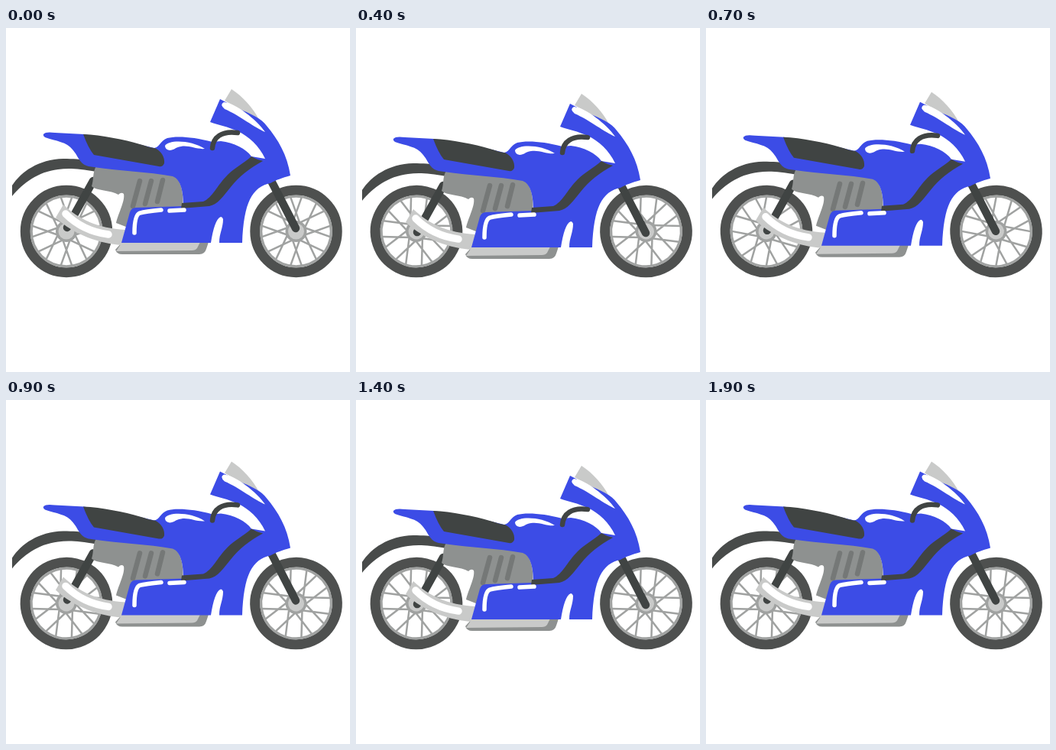
Animation of 450 by 450 pixels, one loop 2000 ms. Source, as an HTML page:

```html
<!DOCTYPE html>
<html lang="en">
<head>
<meta charset="utf-8">
<title>Motorcycle</title>
<style>
  html, body { margin: 0; width: 100%; height: 100%; overflow: hidden; background: #fff; }
  svg { display: block; width: 100vw; height: 100vh; }
  .blue { fill: #3c4ce6; }
  .dark { fill: #404443; }
  .light { fill: #c9cac9; }
  .grey { fill: #8e9190; }
  .white { fill: #fff; }
  .line { fill: none; stroke-linecap: round; stroke-linejoin: round; }
</style>
</head>
<body>
<svg viewBox="0 0 450 450">
  <defs>
    <g id="wheel">
      <circle r="53.7" fill="none" stroke="#4e504f" stroke-width="13"/>
      <circle r="45.8" fill="none" stroke="#a0a2a1" stroke-width="3.2"/>
      <path id="spokes" fill="none" stroke="#a0a2a1" stroke-width="2.5"/>
      <circle r="14" fill="#a0a2a1"/>
      <circle r="10.5" class="light"/>
    </g>
  </defs>

  <g transform="translate(79 266)"><use href="#wheel" class="spin"/></g>
  <g transform="translate(379.5 266)"><use href="#wheel" class="spin"/></g>

  <g id="bike">
    <!-- rear fender, strut and front fork -->
    <path fill="#484b4a" d="M8 206C20 188 42 172 75 171C100 171 120 174 124 180L118 188C95 184 82 183 68 185C42 188 22 203 8 220Z"/>
    <path class="line" stroke="#404443" stroke-width="10.5" d="M114 200L80 261M347 200L379 262"/>

    <!-- engine -->
    <path class="grey" d="M118 181C113 188 115 199 112 207C118 213 137 212 147 218Q151 214 154 217C156 226 147 242 144 255L162 262L231 238C233 215 229 198 218 192L160 181Z"/>
    <path class="line" stroke="#757877" stroke-width="6.5" d="M175 200L166 233M190 200L182 230M205 199L198 227"/>

    <!-- exhaust and belly plate -->
    <path class="grey" d="M152 280H265L262 289Q260 296 253 296H152Q145 296 143 290Z"/>
    <path class="light" d="M152 280H254L250 288Q248 291 243 291L144 292Z"/>
    <path class="light" d="M75 231C95 250 120 262 156 264L151 284C124 282 89 271 65 248Z"/>
    <path class="line" stroke="#fff" stroke-width="9.5" d="M78 243C92 257 112 267 134 270"/>

    <!-- bodywork -->
    <path class="light" d="M295 80C309 89 323 104 331 120L286 95Z"/>
    <path class="blue" d="M51 143Q46 139 52 137Q56 136 64 137L102 139L152 147L194 157C201 156 202 147 211 144C222 141 245 142 270 149L281 148C298 150 314 158 321 168L339 171C331 154 318 142 303 135C290 129 278 127 267 123L280 93L303 105C320 112 335 119 341 128C356 146 368 166 372 193C361 196 353 199 346 203C322 208 311 228 309 281H279C279 268 284 262 284 250Q283 247 281 247C275 249 271 262 268 281H151L162 241Q164 235 170 235L232 233C232 215 229 198 218 194C185 188 150 187 115 182L108 181C96 178 95 168 87 159C80 149 65 148 51 143Z"/>
    <path class="dark" d="M101 139C125 140 155 146 175 152C185 155 192 157 195 157C203 161 208 169 207 177Q205 182 200 181L115 166Q108 158 101 139Z"/>
    <path class="dark" d="M230 229L258 227C270 222 276 206 290 192C300 182 310 178 321 168C328 172 333 173 336 174C318 184 305 194 294 208C284 220 277 231 266 233L229 236Z"/>
    <path class="line" stroke="#404443" stroke-width="6.5" d="M270 157C271 143 282 134 303 137"/>

    <!-- highlights -->
    <path class="white" d="M285 97C300 98 328 120 339 136C326 131 305 114 286 106Q279 100 285 97Z"/>
    <path class="white" d="M208 154C212 146 242 146 260 158C249 159 239 153 229 155C221 156 220 160 214 160Q208 159 208 154Z"/>
    <path class="line" stroke="#fff" stroke-width="5.5" d="M168 268C168 255 170 244 175 242C182 240 192 239 203 238M214 239L233 238"/>
  </g>
</svg>
<script>
  const LOOP = 2000, STEP = 100, BOUNCE = 6.5, PAIRS = 8;
  const polar = (radius, angle) =>
    `${radius * Math.cos(angle)} ${radius * Math.sin(angle)}`;

  // Each pair of spokes crosses between hub and rim.
  let spokes = '';
  for (let i = 0; i < PAIRS; i++) {
    const angle = i * 2 * Math.PI / PAIRS;
    for (const side of [-1, 1])
      spokes += `M${polar(11, angle - side * 0.5)}L${polar(45, angle + side * 0.16)}`;
  }
  document.getElementById('spokes').setAttribute('d', spokes);

  const bike = document.getElementById('bike');
  const wheels = document.querySelectorAll('.spin');

  function draw(now) {
    const time = Math.floor(now % LOOP / STEP) * STEP;
    const drop = BOUNCE / 2 * (1 - Math.cos(2 * Math.PI * (time + 20) / 1000));
    bike.setAttribute('transform', `translate(0 ${drop})`);
    for (const wheel of wheels)
      wheel.setAttribute('transform', `rotate(${time / LOOP * 360})`);
    requestAnimationFrame(draw);
  }
  draw(performance.now());
</script>
</body>
</html>
```
